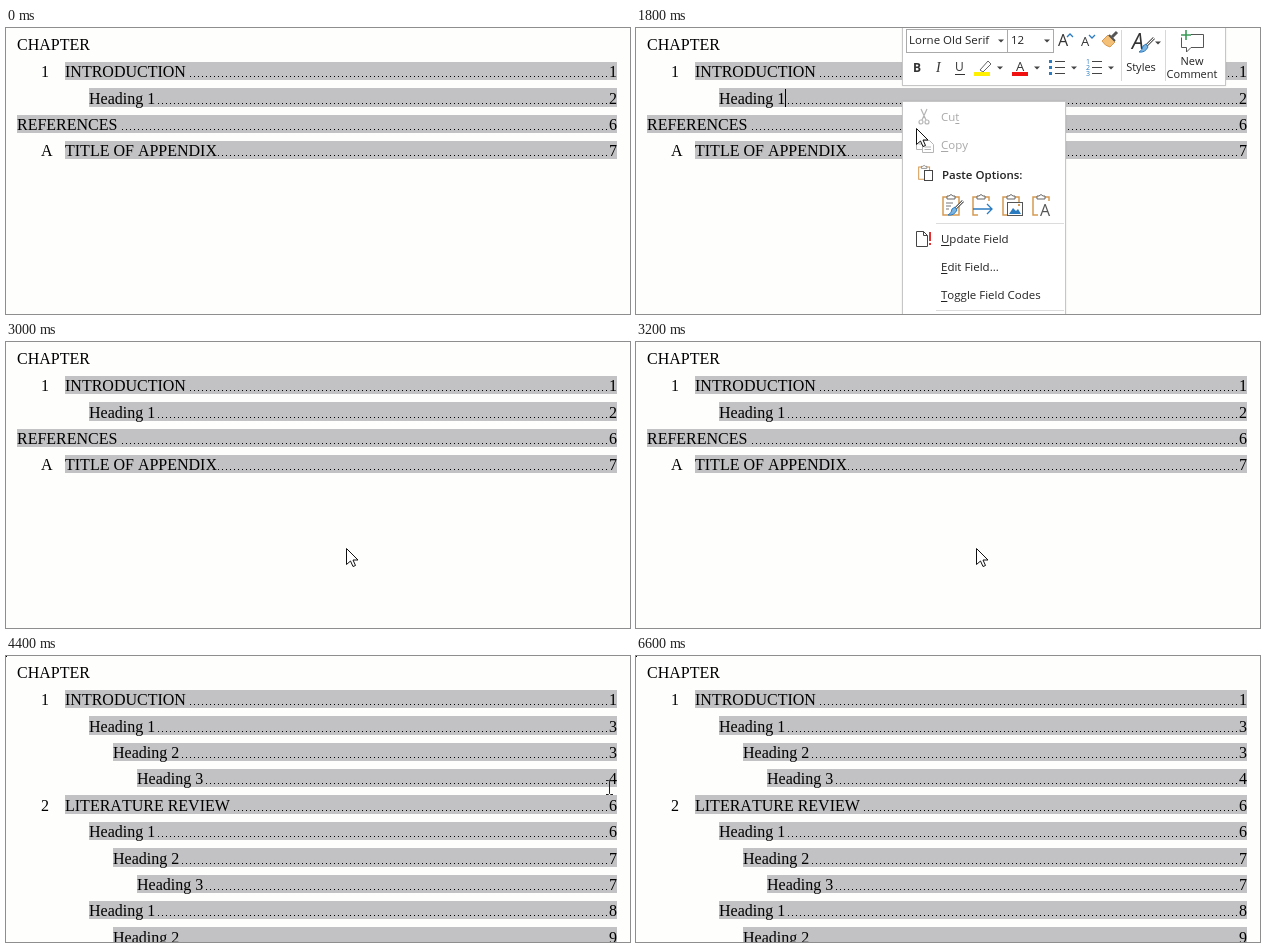
Recreate the animation shown at these times as an HTML page with a canvas. Size 624 px wide and 286 px high, loop 6.8 s.

```html
<!DOCTYPE html>
<html lang="en">
<head>
<meta charset="utf-8">
<title>Updating a table of contents</title>
<style>
html, body { margin: 0; width: 100%; height: 100%; overflow: hidden; background: #fefefd; }
canvas { display: block; }
</style>
</head>
<body>
<canvas id="stage" width="624" height="286"></canvas>
<script>
const ctx = document.getElementById('stage').getContext('2d');
const LOOP = 6800, STEP = 200;
const SERIF = '16px "Liberation Serif", serif';
const SANS = '"Open Sans", sans-serif';
const UI = '11.5px ' + SANS, SMALL = '11px ' + SANS;
const INK = '#333', BLUE = '#2b7bc0', ORANGE = '#d89a52', GREY = '#b5b5b5';

// Entries: indent, title, page, chapter mark
const before = [
  [59, 'INTRODUCTION', 1, '1'], [83, 'Heading 1', 2],
  [11, 'REFERENCES', 6], [59, 'TITLE OF APPENDIX', 7, 'A']
];
const after = [
  [59, 'INTRODUCTION', 1, '1'], [83, 'Heading 1', 3], [107, 'Heading 2', 3], [131, 'Heading 3', 4],
  [59, 'LITERATURE REVIEW', 6, '2'], [83, 'Heading 1', 6], [107, 'Heading 2', 7], [131, 'Heading 3', 7],
  [83, 'Heading 1', 8], [107, 'Heading 2', 9]
];

// Pointer path: step, x, y
const path = [
  [1, 292, 266], [3, 66, 43], [5, 149, 71], [6, 225, 77], [7, 265, 73], [8, 265, 73],
  [13, 340, 206], [16, 340, 206], [17, 342, 207], [18, 342, 207],
  [21, 606, 60], [24, 598, 272], [26, 270, 251], [27, 180, 270]
];
const blinkOn = [17, 18, 20, 21, 23, 24, 28, 29, 31, 32];

function rect(x, y, w, h, fill) {
  ctx.fillStyle = fill;
  ctx.fillRect(x, y, w, h);
}

function box(x, y, w, h, fill, line) {
  rect(x, y, w, h, line);
  rect(x + 1, y + 1, w - 2, h - 2, fill);
}

function text(s, x, y, font = UI, color = '#222', align = 'left') {
  ctx.font = font;
  ctx.fillStyle = color;
  ctx.textAlign = align;
  ctx.fillText(s, x, y);
}

function shape(x, y, d, line, fill, width = 1) {
  const p = new Path2D(d);
  ctx.save();
  ctx.translate(x, y);
  if (fill) { ctx.fillStyle = fill; ctx.fill(p); }
  if (line) { ctx.strokeStyle = line; ctx.lineWidth = width; ctx.stroke(p); }
  ctx.restore();
}

const chevron = (x, y) => shape(x, y, 'M-3 -1.5H3L0 1.5Z', null, '#444');

function contents(rows) {
  text('CHAPTER', 11, 22, SERIF, '#000');
  rows.forEach(([x, title, page, mark], i) => {
    const top = 34.2 + 26.4 * i, y = Math.round(top), base = y + 15;
    rect(x, Math.floor(top), 611 - x, y + 18 - Math.floor(top), '#c2c1c3');
    if (mark) text(mark, 35, base, SERIF, '#000');
    text(title, x, base, SERIF, '#000');
    const dots = Math.floor((603.1 - x - ctx.measureText(title).width) / 4);
    for (let n = 1; n <= dots; n++) rect(604 - 4 * n, base - 1, 1, 1, '#000');
    text(page, 603, base, SERIF, '#000');
  });
}

function panel(x, y, w, h) {
  ctx.save();
  ctx.shadowColor = 'rgba(0,0,0,.1)';
  ctx.shadowBlur = 2;
  rect(x, y, w, h, '#c6c6c6');
  ctx.restore();
  rect(x + 1, y + 1, w - 2, h - 2, '#fff');
}

function brush(x, y) {
  shape(x, y, 'M16 1L8 9', '#666', null, 3);
  shape(x, y, 'M16 1L8 9', '#fff');
  shape(x, y, 'M8 7L10 10Q7 16 1 15Q5 13 5 9Z', BLUE, '#7db4e0');
}

function list(x, numbered) {
  [33, 39, 45].forEach((y, i) => {
    if (numbered) text(i + 1, x, y + 3, '7px ' + SANS, BLUE);
    else rect(x, y - 1, 3, 3, BLUE);
    rect(x + 6, y, 10, 1, '#444');
  });
}

function toolbar() {
  panel(266, -2, 324, 60);
  box(270, 1, 102, 24, '#fff', '#aaa');
  box(371, 1, 47, 24, '#fff', '#aaa');
  ctx.save();
  ctx.beginPath();
  ctx.rect(271, 3, 86, 21);
  ctx.clip();
  text('Lorne Old Serif', 273, 16);
  ctx.restore();
  text('12', 375, 16);
  chevron(365, 13);
  chevron(411, 13);

  text('A', 422, 18, '16px ' + SANS, INK);
  shape(434, 8, 'M-3 1L0 -2L3 1', BLUE, null, 1.3);
  text('A', 445, 18, '13px ' + SANS, INK);
  shape(456, 8, 'M-3 -1L0 2L3 -1', BLUE, null, 1.3);
  shape(466, 4, 'M10 5L15 0', '#555', null, 3);
  shape(466, 4, 'M6 3L13 10L8 15Q3 14 0 9Z', ORANGE, '#f4c078');
  shape(466, 4, 'M7 3L13 9', '#555', null, 2);

  text('B', 277, 44, 'bold 12px ' + SANS, INK);
  text('I', 300, 44, 'italic 14px "Liberation Serif", serif', INK);
  text('U', 319, 43, '12px ' + SANS, INK);
  rect(319, 46, 10, 1, INK);
  shape(340, 31, 'M4 11L12 2L15 5L7 13Z', '#666', '#fff');
  rect(338, 44, 16, 4, '#ffef00');
  text('A', 380, 43, '13px ' + SANS, INK);
  rect(376, 44, 16, 4, '#f01010');
  list(413, false);
  list(450, true);
  [364, 401, 438, 475].forEach(x => chevron(x, 40));

  rect(485, 2, 1, 51, '#d8d8d8');
  text('A', 496, 21, 'italic 21px ' + SANS, INK);
  brush(502, 9);
  chevron(522, 15);
  text('Styles', 505, 43, SMALL, '#222', 'center');
  rect(529, 2, 1, 51, '#d8d8d8');
  shape(545, 3, 'M.5 3.5H22.5V16.5H10L5.5 21V16.5H.5Z', '#555', '#fff');
  shape(550, 7, 'M-5 0H5M0 -5V5', '#fff', null, 5);
  shape(550, 7, 'M-5 0H5M0 -5V5', '#3a9b57', null, 1.6);
  text('New', 556, 37, SMALL, '#222', 'center');
  text('Comment', 556, 50, SMALL, '#222', 'center');
}

function clipboard(x, y, s = 1) {
  ctx.save();
  ctx.translate(x, y);
  ctx.scale(s, s);
  shape(0, 0, 'M1 3H17V21H1Z', ORANGE, '#fff', 1.5);
  shape(0, 0, 'M5 5V2H7Q9 -1 11 2H13V5Z', '#666', '#fff');
  ctx.restore();
}

function pasteIcons() {
  [306, 336, 366, 396].forEach(x => clipboard(x, 166));
  shape(306, 166, 'M4 9H11M4 12H9M4 15H7', '#777');
  brush(311, 172);
  rect(342, 173, 14, 15, '#fff');
  shape(342, 181, 'M-5 0H14M9 -5L14 0L9 5', BLUE, null, 1.3);
  box(371, 174, 16, 14, '#fff', '#555');
  shape(371, 174, 'M2 12L6 6L9 9L11 7L14 12Z', null, BLUE);
  rect(382, 176, 2, 2, ORANGE);
  rect(402, 173, 15, 16, '#fff');
  text('A', 404, 188, '16px ' + SANS, '#555');
}

function item(label, y, key, color = '#222') {
  text(label, 305, y, UI, color);
  const lead = ctx.measureText(label.slice(0, key)).width;
  rect(305 + lead, y + 2, ctx.measureText(label[key]).width, 1, color);
}

function menu(hover) {
  panel(266, 73, 164, 230);
  if (hover) rect(268, 197, 160, 28, '#d2d0d3');
  item('Cut', 93, 2, '#a8a8a8');
  item('Copy', 121, 0, '#a8a8a8');
  text('Paste Options:', 306, 151, '600 ' + UI);
  rect(300, 195, 128, 1, '#dcdcdc');
  item('Update Field', 215, 0);
  item('Edit Field...', 243, 0);
  item('Toggle Field Codes', 271, 0);
  rect(300, 282, 128, 1, '#dcdcdc');

  shape(282, 81, 'M3 0L8 11M9 0L4 11M3 11A2 2 0 1 0 3 15A2 2 0 1 0 3 11M9 11A2 2 0 1 0 9 15A2 2 0 1 0 9 11', GREY, null, 1.2);
  shape(280, 109, 'M.5 .5H8.5V12.5H.5Z M2.5 4H6M2.5 7H6', GREY, '#fff');
  shape(286, 112, 'M.5 .5H7.5L11.5 4.5V12.5H.5Z M2.5 7H9M2.5 9.5H9', GREY, '#fff');
  clipboard(282, 137, .68);
  box(288, 142, 9, 11, '#fff', '#444');
  pasteIcons();
  shape(280, 203, 'M.5 .5H7.5L11.5 4.5V15.5H.5ZM7.5 .5V4.5H11.5', '#444', '#fff');
  rect(293, 204, 2, 9, '#e03030');
  rect(293, 215, 2, 2, '#e03030');
}

function pointer(k) {
  const next = path.findIndex(p => p[0] >= k);
  if (k < 1 || next < 0) return;
  const b = path[next], a = path[Math.max(0, next - 1)];
  const f = b === a ? 1 : (k - a[0]) / (b[0] - a[0]);
  const x = Math.round(a[1] + (b[1] - a[1]) * f);
  const y = Math.round(a[2] + (b[2] - a[2]) * f);
  if (k >= 7 && k < 17)
    shape(x + .5, y + .5, 'M0 0V16L4 12.5L6.5 18L9 17L6.5 11.5H11.5Z', '#111', '#fff');
  else
    shape(x + .5, y + .5, 'M-3.5 -7H-1L0 -6L1 -7H3.5M0 -6V6M-3.5 7H-1L0 6L1 7H3.5', '#222');
}

function draw(k) {
  rect(0, 0, 624, 286, '#fefefd');
  contents(k < 17 ? before : after);
  if (k >= 5 && k < 15) rect(149, 61, 1, 18, '#000');
  if (blinkOn.includes(k)) rect(59, 34, 1, 18, '#000');
  if (k >= 8 && k < 15) {
    toolbar();
    menu(k > 12);
  }
  if (k >= 19) rect(0, 0, 1, 1, '#000');
  pointer(k);
}

ctx.fontKerning = 'none';
const start = performance.now();
function tick() {
  draw(Math.floor((performance.now() - start) % LOOP / STEP));
  requestAnimationFrame(tick);
}
tick();
</script>
</body>
</html>
```
